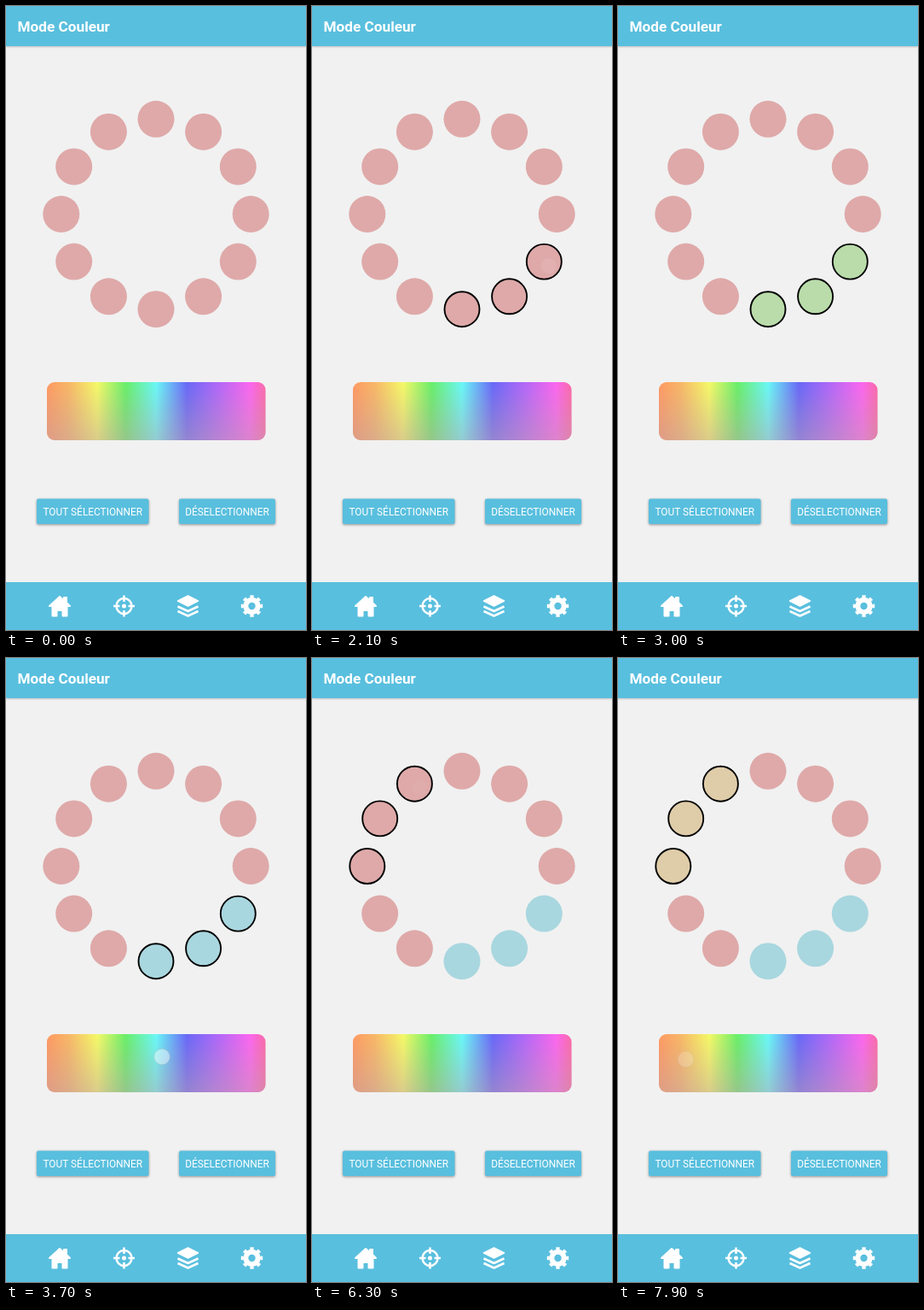
Recreate the animation shown at these times as an HTML page. Size 352x730 px, loop 8000 ms.

```html
<!DOCTYPE html>
<html lang="fr">
<head>
<meta charset="utf-8">
<title>Mode Couleur</title>
<style>
  html, body { margin: 0; width: 100%; height: 100%; overflow: hidden; background: #f1f1f1; }
  svg { display: block; width: 352px; height: 730px; font-family: Roboto, sans-serif; fill: #fff; }
  .bar { fill: #59bfde; }
  .raised { filter: drop-shadow(0 1.5px 1.5px #0006); }
  .label { font-size: 11.9px; text-anchor: middle; }
  .line { fill: none; stroke: #fff; }
</style>
</head>
<body>
<svg viewBox="0 0 352 730">
  <defs>
    <linearGradient id="hues">
      <stop offset="0" stop-color="#ff9961"/>
      <stop offset=".1" stop-color="#f8b766"/>
      <stop offset=".23" stop-color="#f5f967"/>
      <stop offset=".36" stop-color="#68ef68"/>
      <stop offset=".5" stop-color="#68f8f7"/>
      <stop offset=".64" stop-color="#6868f8"/>
      <stop offset=".78" stop-color="#af67f8"/>
      <stop offset=".93" stop-color="#fb66ef"/>
      <stop offset="1" stop-color="#fb6aa8"/>
    </linearGradient>
    <linearGradient id="dull" x2="0" y2="1">
      <stop offset="0" stop-color="#bfa0ab" stop-opacity="0"/>
      <stop offset="1" stop-color="#bfa0ab" stop-opacity=".5"/>
    </linearGradient>
  </defs>

  <rect width="352" height="47" class="bar" style="filter:drop-shadow(0 1px 1px #0003)"/>
  <text x="13.5" y="30" font-size="17.2" font-weight="700">Mode Couleur</text>

  <g id="lamps"></g>

  <rect x="48" y="440" width="256.5" height="68" rx="9" fill="url(#hues)"/>
  <rect x="48" y="440" width="256.5" height="68" rx="9" fill="url(#dull)"/>

  <rect x="36" y="576.5" width="131.5" height="29.5" rx="2" class="bar raised"/>
  <text x="101.8" y="596" class="label">TOUT SÉLECTIONNER</text>
  <rect x="203" y="576.5" width="113" height="29.5" rx="2" class="bar raised"/>
  <text x="259.5" y="596" class="label">DÉSELECTIONNER</text>

  <rect y="674" width="352" height="56" class="bar"/>
  <g transform="translate(63 702)" stroke="#fff" stroke-width="2" stroke-linejoin="round">
    <path d="M-12 0L0-11L5-6.5V-10H8V-4L12 0H8.500V11.500H3.500V5H-3.500V11.500H-8.500V0Z"/>
  </g>
  <g transform="translate(138.500 702)" class="line" stroke-width="2.500">
    <circle r="9"/>
    <path d="M-12.500 0H-5M5 0H12.500M0-12.500V-5M0 5V12.500"/>
    <circle r="2.500" fill="#fff" stroke="none"/>
  </g>
  <g transform="translate(213.500 702)" stroke-linejoin="round">
    <path d="M0-12L12-6L0 0L-12-6Z" stroke="#fff" stroke-width="1.500"/>
    <path d="M-12 .5L0 6L12 .5M-12 6L0 11.500L12 6" class="line" stroke-width="2.600"/>
  </g>
  <g transform="translate(288.500 702)" class="line">
    <circle r="7.200" stroke-width="6"/>
    <circle r="11" stroke-width="3.500" pathLength="16" stroke-dasharray="1" stroke-dashoffset=".5"/>
  </g>

  <circle id="touch" r="9.3" fill="#fffc" stroke="#bbb9" stroke-width="1"/>
</svg>
<script>
const LOOP = 8000, FADE = 280, PINK = '#dfa9a9';
const touch = document.getElementById('touch');
const group = document.getElementById('lamps');

// Twelve lamps, clockwise from the top
const lamps = Array.from({ length: 12 }, (_, i) => {
  const lamp = document.createElementNS('http://www.w3.org/2000/svg', 'circle');
  lamp.setAttribute('cx', 176 + 111.2 * Math.sin(i * Math.PI / 6));
  lamp.setAttribute('cy', 243.5 - 111.2 * Math.cos(i * Math.PI / 6));
  lamp.setAttribute('stroke-width', 1.9);
  return group.appendChild(lamp);
});

// Each tap toggles a lamp, paints the selection or clears it
const taps = [
  { at: 550, hold: 200, x: 180, y: 359, lamp: 6 },
  { at: 1050, hold: 200, x: 239, y: 346, lamp: 5 },
  { at: 1650, hold: 200, x: 278, y: 304, lamp: 4 },
  { at: 2420, hold: 230, x: 131.5, y: 467.5, paint: '#b9dcaa' },
  { at: 3350, hold: 230, x: 183, y: 466.5, paint: '#a9d7df' },
  { at: 4420, hold: 230, x: 262, y: 592, clear: true },
  { at: 5250, hold: 150, x: 76.5, y: 247.5, lamp: 9 },
  { at: 5620, hold: 120, x: 88, y: 193, lamp: 10 },
  { at: 5950, hold: 80, x: 127, y: 152, lamp: 11 },
  { at: 7420, hold: 270, x: 79.5, y: 469.5, paint: '#dfcca9' },
];

function draw(t) {
  const colors = lamps.map(() => PINK);
  let selected = new Set(), opacity = 0;

  for (const tap of taps) {
    const age = t - tap.at;
    if (age < 0) break;
    touch.setAttribute('cx', tap.x);
    touch.setAttribute('cy', tap.y);
    opacity = Math.max(0, Math.min(1, age / 80, 1 - (age - tap.hold) / FADE));
    if (age < 100) break;
    if (tap.lamp) selected.add(tap.lamp);
    if (tap.paint) selected.forEach(i => colors[i] = tap.paint);
    if (tap.clear) selected = new Set();
  }

  touch.setAttribute('opacity', opacity);
  lamps.forEach((lamp, i) => {
    const on = selected.has(i);
    lamp.setAttribute('r', on ? 20.5 : 21.5);
    lamp.setAttribute('fill', colors[i]);
    lamp.setAttribute('stroke', on ? '#000' : 'none');
  });
}

function frame() {
  draw(performance.now() % LOOP);
  requestAnimationFrame(frame);
}
frame();
</script>
</body>
</html>
```
